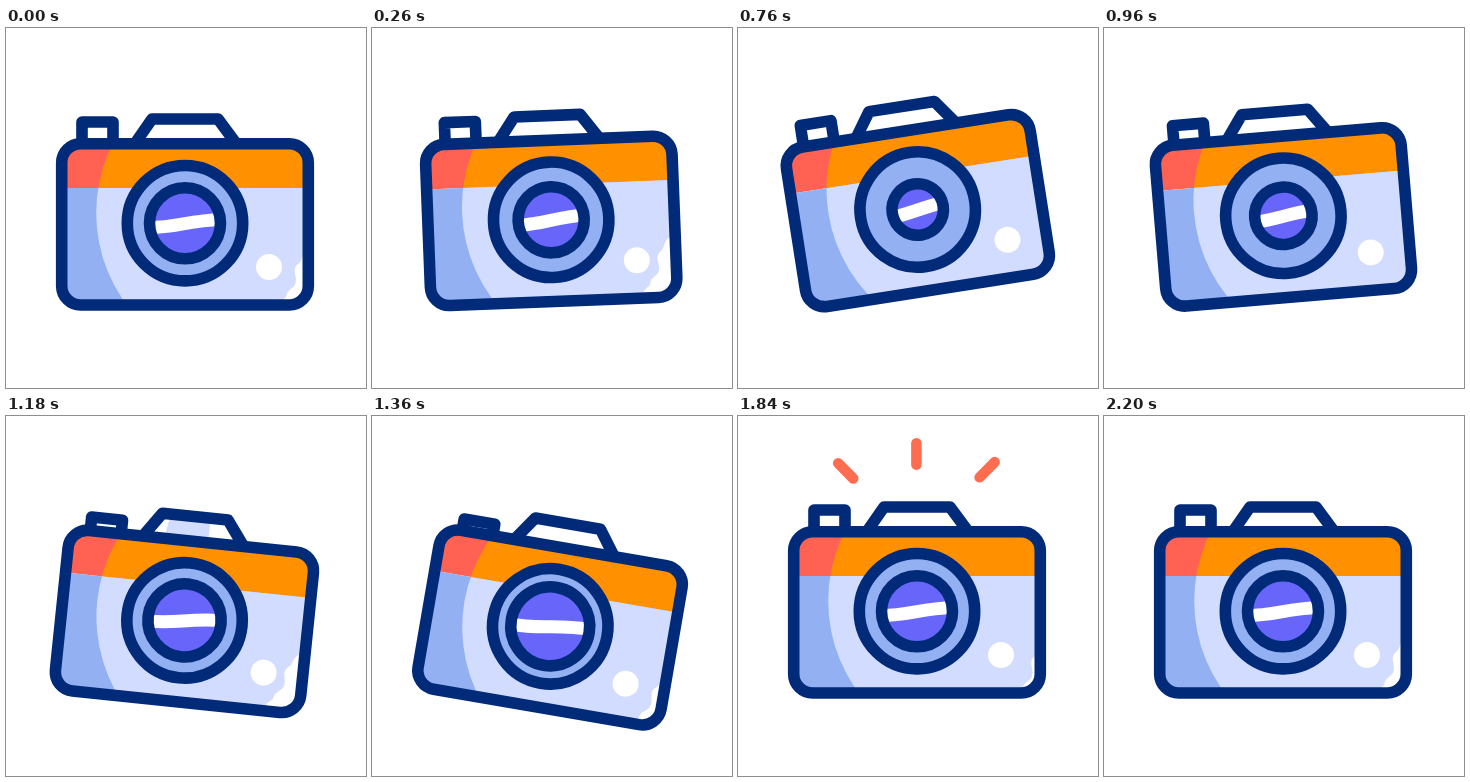
These frames come from a looping animation (360x360 px, 2.22 s). An HTML page:

```html
<!DOCTYPE html>
<html lang="en">
<head>
<meta charset="utf-8">
<title>Camera</title>
<style>
  html, body { margin: 0; width: 100%; height: 100%; overflow: hidden; background: #fff; }
  svg { display: block; width: 100%; height: 100%; }
  .line { fill: none; stroke: #012a79; stroke-width: 11.6; stroke-linejoin: round; }
  .spark { stroke: #ff6d50; stroke-width: 10.5; stroke-linecap: round; }
</style>
</head>
<body>
<svg viewBox="0 0 360 360">
  <defs>
    <clipPath id="bodyClip"><rect x="55.7" y="115.7" width="246.6" height="161.3" rx="19"/></clipPath>
    <clipPath id="lensClip"><circle id="lensHole" cx="179" cy="195.2" r="35"/></clipPath>
  </defs>
  <g id="camera">
    <g id="sparks"></g>
    <path id="button" class="line" d="M76 124V94H107V124" style="fill:#fff"/>
    <path d="M130 114L146 91H212L229 114Z" fill="#fff"/>
    <path id="glintA" d="M155 97A15 8 0 0 0 185 97V90H155Z" fill="#d2dcff"/>
    <path id="glintB" d="M154 93H194.5V112H151Z" fill="#d2dcff"/>
    <path class="line" d="M130 114L146 91H212L229 114"/>
    <g clip-path="url(#bodyClip)">
      <rect x="50" y="110" width="260" height="50" fill="#ff6252"/>
      <rect x="50" y="160" width="260" height="120" fill="#92b0f2"/>
      <path d="M109.3 110A153.7 153.7 0 0 0 90 160H310V110Z" fill="none"/>
      <clipPath id="lit"><circle cx="243.9" cy="185" r="153.7"/></clipPath>
      <g clip-path="url(#lit)">
        <rect x="50" y="110" width="260" height="50" fill="#ff9100"/>
        <rect x="50" y="160" width="260" height="120" fill="#d2dcff"/>
      </g>
      <path id="corner" fill="#fff" d="M297 217C289 222 292 228 287 231C281 236 285 241 285 247C285 256 277 255 275.500 262C275 267 269 266 268 274V290H320V217Z"/>
      <circle cx="263" cy="239" r="13" fill="#fff"/>
    </g>
    <rect class="line" x="55.7" y="115.7" width="246.6" height="161.3" rx="19"/>
    <circle class="line" cx="179" cy="195.2" r="57.7" style="fill:#92b0f2"/>
    <g clip-path="url(#lensClip)">
      <rect x="130" y="145" width="100" height="100" fill="#6865fb"/>
      <path d="M138 199.500C168 201 184 191.500 220 191.500" fill="none" stroke="#fff" stroke-width="13"/>
    </g>
    <circle id="ring" class="line" cx="179" cy="195.2" r="35.5"/>
  </g>
</svg>
<script>
const LOOP = 2220;
const $ = id => document.getElementById(id);
const clamp = x => Math.min(1, Math.max(0, x));
const ease = x => (1 - Math.cos(Math.PI * clamp(x))) / 2;
const linear = clamp;

// keys: [time, value] pairs
function track(keys, t, curve = ease) {
  for (let i = 1; i < keys.length; i++) {
    const [t0, a] = keys[i - 1], [t1, b] = keys[i];
    if (t <= t1) return a + (b - a) * curve((t - t0) / (t1 - t0));
  }
  return keys[keys.length - 1][1];
}

const swing = (rest, low, high) => [[0, rest], [785, low], [1352, high], [1600, rest]];
const angleKeys = swing(0, -8.9, 9.8);
const ringKeys = swing(35.5, 25.7, 39.5);
const pressKeys = swing(0, 0, 10);
const cornerKeys = [[0, 5], [260, 0], [400, 4], [540, 30], [900, 26], [960, 22],
  [1180, 0], [1350, 6], [1520, 15], [1640, 12], [2200, 5]];

const sparks = [[126.3, 73.7, -0.7, -0.71], [178.4, 64.5, 0, -1], [230.5, 72.6, 0.7, -0.71]].map(ray => {
  const el = document.createElementNS('http://www.w3.org/2000/svg', 'line');
  el.setAttribute('class', 'spark');
  $('sparks').append(el);
  return { el, ray };
});

function set(el, attrs) {
  for (const k in attrs) el.setAttribute(k, attrs[k]);
}

const show = (el, on) => set(el, { visibility: on ? 'visible' : 'hidden' });

function draw(t) {
  const a = track(angleKeys, t);
  set($('camera'), { transform: `translate(${-0.1 * a} ${1.55 * a}) rotate(${a} 179.2 196.5)` });

  const r = track(ringKeys, t);
  set($('ring'), { r });
  set($('lensHole'), { r });

  set($('button'), { transform: `translate(0 ${track(pressKeys, t)})` });

  const c = track(cornerKeys, t, linear);
  set($('corner'), { transform: `translate(${c} ${c})` });

  show($('glintA'), t >= 480 && t < 660);
  show($('glintB'), t >= 1120 && t < 1260);

  const tip = 42.5 * ease((t - 1372) / 606);
  const tail = 42.5 * ease((t - 1590) / 600);
  for (const { el, ray: [x, y, dx, dy] } of sparks) {
    set(el, { x1: x + dx * tail, y1: y + dy * tail, x2: x + dx * tip, y2: y + dy * tip });
    show(el, tip > 0 && t < 2190);
  }
}

const start = performance.now();
function frame() {
  draw((performance.now() - start) % LOOP);
  requestAnimationFrame(frame);
}
draw(0);
requestAnimationFrame(frame);
</script>
</body>
</html>
```
